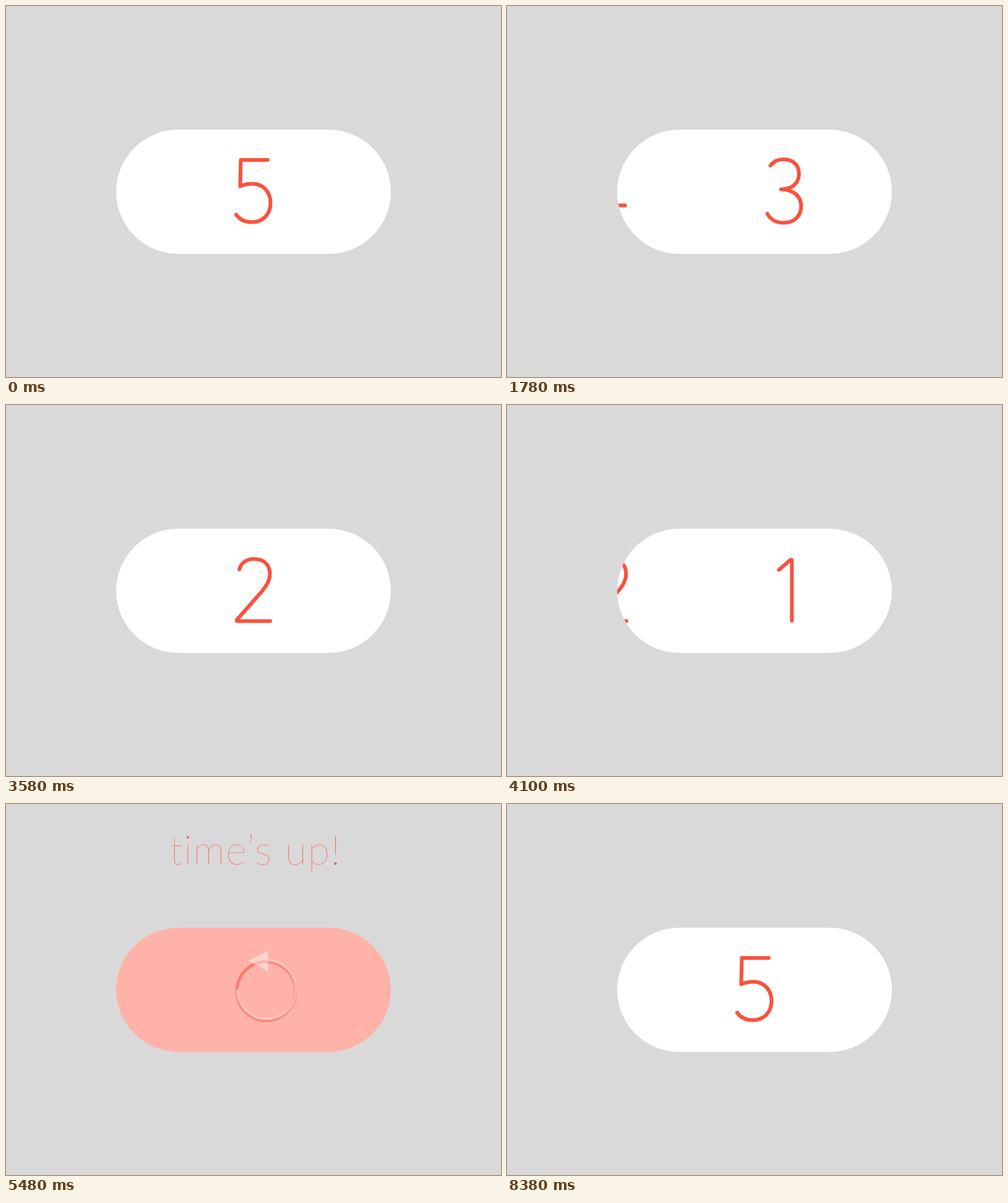
Recreate the animation shown at these times as an HTML page. Size 800 by 600 pixels, loop 8760 ms.

```html
<!DOCTYPE html>
<html lang="en">
<head>
<meta charset="utf-8">
<title>Countdown button</title>
<style>
  html, body { margin: 0; width: 100%; height: 100%; overflow: hidden; background: #d9d9d9; }
  svg { display: block; width: 800px; height: 600px; }
  #digits { fill: none; stroke: #fb513d; stroke-width: 6; stroke-linecap: round; stroke-linejoin: round; }
  #message { font: 100 65px Lato, sans-serif; letter-spacing: 1.6px; fill: #ff4f39; text-anchor: middle; }
</style>
</head>
<body>
<svg viewBox="0 0 800 600">
  <clipPath id="pill"><rect x="178" y="200" width="444" height="201" rx="100.5"/></clipPath>
  <text id="message" x="403" y="162">time’s up!</text>
  <rect x="178" y="200" width="444" height="201" rx="100.5" fill="#fff"/>
  <rect id="alarm" x="178" y="200" width="444" height="201" rx="100.5" fill="#ff4f39"/>
  <g clip-path="url(#pill)">
    <g id="digits">
      <path d="M423 249H379.5L378.5 291.5C384 289 391 287.5 398 287.5C415 287.5 427.5 300 427.5 318.5C427.5 337 415 349.5 398 349.5C386 349.5 377 345 372 337.5"/>
      <path d="M415.5 349V251.5Q414.5 248.5 412 251L368.5 318.5Q366 322.5 370 322.5H433"/>
      <path d="M378 258C383 251 391 248 399.5 248C414 248 424 257 424 271C424 286 414 296 395 296.5C416 297 427.5 308 427.5 323.5C427.5 340 416 350.5 400 350.5C388 350.5 378 346 373 336"/>
      <path d="M377 266C380 255 389 249 401 249C416 249 426.5 258 426.5 273C426.5 284 421 292 413 302L373.5 347Q371.5 349.5 374 349.5H427"/>
      <path d="M383.5 266.5L401 251.5Q404.5 248.5 404.5 252V349"/>
      <circle cx="400" cy="302.5" r="47.5" stroke-width="5"/>
    </g>
    <g id="restart">
      <path d="M353 300A47.5 47.5 0 1 0 402 253" fill="none" stroke="#fff" stroke-width="4"/>
      <path d="M371 253.5L403 237V270.5Z" fill="#fff"/>
    </g>
  </g>
</svg>
<script>
const LOOP = 8760, SPACING = 290, SLIDE = 1040;
const slideStarts = [148, 1348, 2509, 3706, 4868];
const ALARM_START = 5275, RESET_START = 7175;

const $ = id => document.getElementById(id);
const message = $('message'), alarm = $('alarm'), digits = $('digits'), restart = $('restart');
const progress = (t, start, length) => Math.min(1, Math.max(0, (t - start) / length));
const smooth = x => x * x * (3 - 2 * x);

// cubic-bezier(.05, 0, 0, 1): abrupt departure, long settling
function snap(x) {
  let low = 0, high = 1;
  for (let i = 0; i < 24; i++) {
    const s = (low + high) / 2;
    if (.15 * (1 - s) ** 2 * s + s ** 3 < x) low = s; else high = s;
  }
  return x <= 0 ? 0 : x >= 1 ? 1 : smooth((low + high) / 2);
}

function draw(t) {
  const resetting = t >= RESET_START;
  const position = slideStarts.reduce((sum, start) => sum + snap(progress(t, start, SLIDE)), 0);
  const strip = resetting ? 0 : position;
  const red = smooth(progress(t, ALARM_START, 450)) * (1 - smooth(progress(t, RESET_START, 625)));

  [...digits.children].forEach((digit, i) =>
    digit.setAttribute('transform', `translate(${SPACING * (i - strip)} 0)`));
  restart.setAttribute('transform', `translate(${SPACING * (5 - position)} 0)`);
  digits.setAttribute('opacity', 1 - red);
  restart.setAttribute('opacity', red);
  alarm.setAttribute('opacity', red);

  const drop = snap(progress(t, ALARM_START, 900));
  message.setAttribute('transform', `translate(0 ${-180 * (1 - drop)})`);
  message.setAttribute('opacity', resetting ? red : drop > 0 ? 1 : 0);
}

function tick() {
  draw(performance.now() % LOOP);
  requestAnimationFrame(tick);
}
tick();
</script>
</body>
</html>
```
